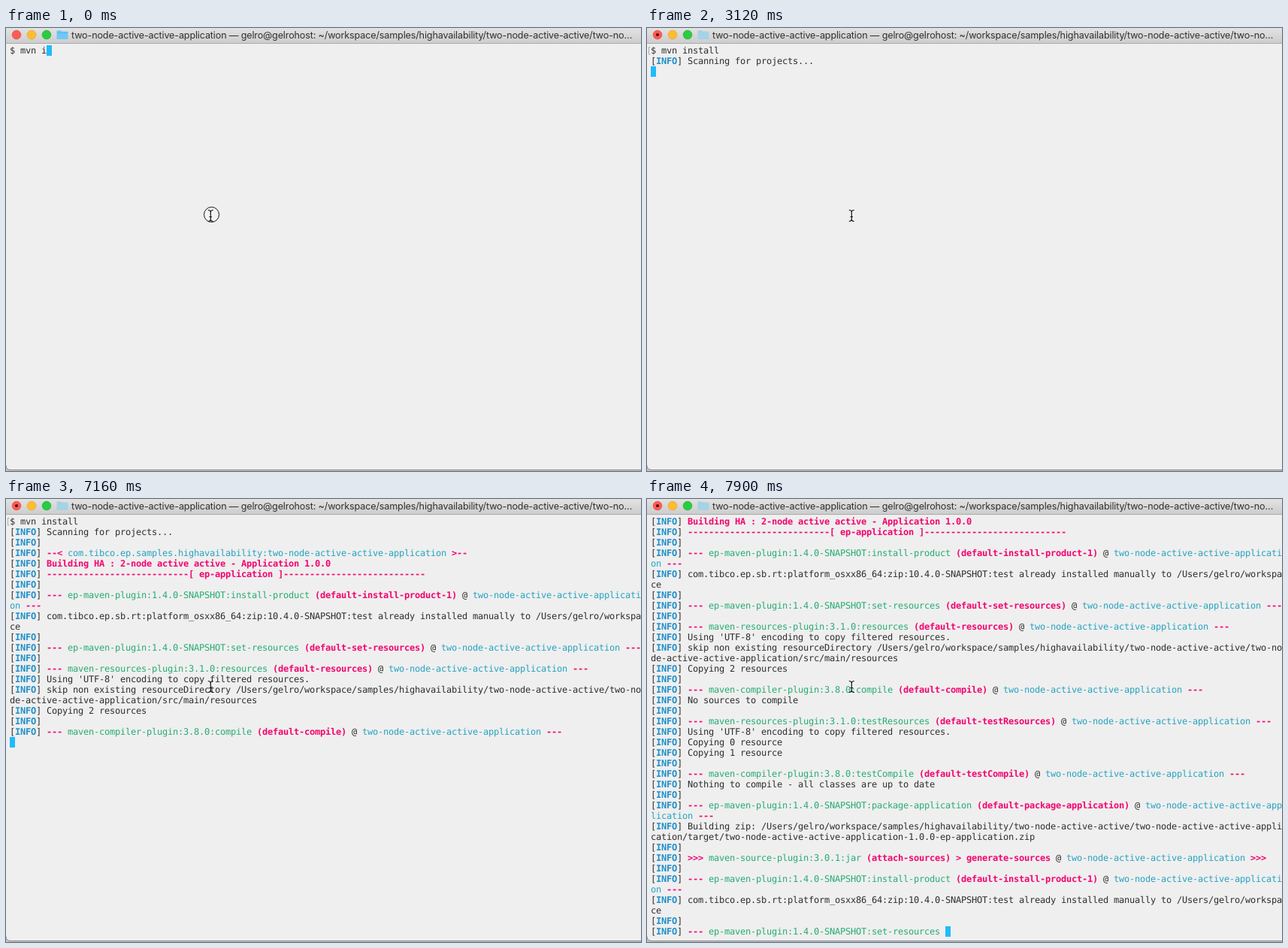
An HTML page that plays this animation: 845 by 590 pixels, repeating every 8000 ms.

```html
<!DOCTYPE html>
<html lang="en">
<head>
<meta charset="utf-8">
<title>Terminal build</title>
<style>
  html, body { margin: 0; width: 100%; height: 100%; overflow: hidden; background: #c4c4c4; }
  svg { display: block; width: 845px; height: 590px; }
  #title { font: 12.6px Inter, Roboto, sans-serif; letter-spacing: -.15px; fill: #303030; }
  #rows { font: 12px "DejaVu Sans Mono", monospace; letter-spacing: -.2246px; text-rendering: geometricPrecision; }
  #rows text { white-space: pre; fill: #2e2e2e; }
  #rows .info { fill: #1f8fc9; font-weight: bold; }
  #rows .pink { fill: #f4046f; font-weight: bold; }
  #rows .cyan { fill: #27a3c0; }
  #rows .green { fill: #26ac74; }
</style>
</head>
<body>
<svg viewBox="0 0 845 590">
  <defs>
    <linearGradient id="bar" x2="0" y2="1">
      <stop stop-color="#e2e2e2"/><stop offset="1" stop-color="#cdcdcd"/>
    </linearGradient>
  </defs>
  <path d="M0 0H845V588H6Q0 588 0 582Z" fill="#efefef"/>
  <path d="M0 582.5Q0 588.5 6 588.5H845" fill="none" stroke="#8c8c8c"/>
  <rect width="845" height="20" fill="url(#bar)"/>
  <rect y="20" width="845" height="1" fill="#aaa"/>
  <g stroke-width=".6">
    <circle cx="14" cy="9" r="5.9" fill="#fc5b57" stroke="#e2453f"/>
    <circle cx="34" cy="9" r="5.9" fill="#fdbd30" stroke="#e0a028"/>
    <circle cx="54" cy="9" r="5.9" fill="#29cc42" stroke="#1eac2d"/>
  </g>
  <circle id="dot" cx="14" cy="9" r="2.1" fill="#5a0906"/>
  <path id="folder" d="M67.5 4.2q0-1 1-1h4.5l1.5 1.3h7q1 0 1 1v8.5q0 1-1 1h-13q-1 0-1-1z"/>
  <path id="fold" d="M68 6.5H82.5" stroke="#4fb3ea" stroke-width=".8"/>
  <text id="title" x="87" y="14">two-node-active-active-application — gelro@gelrohost: ~/workspace/samples/highavailability/two-node-active-active/two-no…</text>
  <rect id="cursor" width="7" height="14" fill="#20bbfd"/>
  <path id="mark" d="M4.5 25.5H2.5V35H4.5" fill="none" stroke="#aaa"/>
  <g id="rows"></g>
  <circle id="click" cx="273.5" cy="248.5" r="10" fill="#f4f4f4" stroke="#111"/>
  <path d="M268.8 242.5Q272.3 242.5 272.3 245.5Q272.3 242.5 275.8 242.5M272.3 245V255M268.8 257.5Q272.3 257.5 272.3 254.5Q272.3 257.5 275.8 257.5M270.5 251.5H274" fill="none" stroke="#111" stroke-width="1.2"/>
</svg>
<script>
const LOOP = 8000, COLS = 120, CELL = 7, LINE = 14, LEFT = 5, TOP = 23;
const NS = "http://www.w3.org/2000/svg";
const $ = id => document.getElementById(id);

const app = "two-node-active-active-application";
const home = "/Users/gelro/workspace";
const project = home + "/samples/highavailability/two-node-active-active/" + app;

// A line is a list of [class, text] spans.
const info = (...spans) => [["", "["], ["info", "INFO"], ["", "] "], ...spans];
const say = text => info(["", text]);
const pink = text => info(["pink", text]);
const goal = (plugin, id, arrow = "---", phase = "") => info(
  ["pink", arrow + " "], ["green", plugin + " "], ["pink", `(${id})${phase}`],
  ["", " @ "], ["cyan", app], ["pink", " " + arrow]);
const ep = "ep-maven-plugin:1.4.0-SNAPSHOT:";
const res = "maven-resources-plugin:3.1.0:";
const javac = "maven-compiler-plugin:3.8.0:";
const blank = say("");
const product = goal(ep + "install-product", "default-install-product-1");
const installed = say("com.tibco.ep.sb.rt:platform_osxx86_64:zip:10.4.0-SNAPSHOT:test already installed manually to " + home);
const encoding = say("Using 'UTF-8' encoding to copy filtered resources.");
const rule = "-".repeat(27);

const lines = [
  [["", "$ mvn install"]],
  say("Scanning for projects..."),
  blank,
  info(["pink", "--< "], ["cyan", "com.tibco.ep.samples.highavailability:" + app], ["pink", " >--"]),
  pink("Building HA : 2-node active active - Application 1.0.0"),
  pink(`${rule}[ ep-application ]${rule}`),
  blank,
  product,
  installed,
  blank,
  goal(ep + "set-resources", "default-set-resources"),
  blank,
  goal(res + "resources", "default-resources"),
  encoding,
  say(`skip non existing resourceDirectory ${project}/src/main/resources`),
  say("Copying 2 resources"),
  blank,
  goal(javac + "compile", "default-compile"),
  say("No sources to compile"),
  blank,
  goal(res + "testResources", "default-testResources"),
  encoding,
  say("Copying 0 resource"),
  say("Copying 1 resource"),
  blank,
  goal(javac + "testCompile", "default-testCompile"),
  say("Nothing to compile - all classes are up to date"),
  blank,
  goal(ep + "package-application", "default-package-application"),
  say(`Building zip: ${project}/target/${app}-1.0.0-ep-application.zip`),
  blank,
  goal("maven-source-plugin:3.0.1:jar", "attach-sources", ">>>", " > generate-sources"),
  blank,
  product,
  installed,
  blank,
  info(["pink", "--- "], ["green", ep + "set-resources "]),
];

function add(parent, tag, attrs) {
  const el = document.createElementNS(NS, tag);
  for (const key in attrs) el.setAttribute(key, attrs[key]);
  return parent.appendChild(el);
}

// Lay the lines out in rows, wrapping at the window's width.
const rows = [];
for (const line of lines) {
  let col = 0, row = null;
  const open = () => rows.push(row = add($("rows"), "text", {}));
  open();
  for (let [cls, text] of line) {
    while (text) {
      if (col === COLS) { open(); col = 0; }
      const part = text.slice(0, COLS - col);
      add(row, "tspan", { x: LEFT + col * CELL, class: cls }).textContent = part;
      col += part.length;
      text = text.slice(part.length);
    }
  }
}
const prompt = rows[0].firstChild;

// [time, typed letters of the goal]
const typing = [[0, 1], [140, 2], [290, 3], [440, 5], [1040, 6], [1190, 7]];
// [time, rows shown, cursor row, cursor column]
const output = [
  [2080, 1, 1, 0], [3120, 2, 2, 0], [4620, 6, 6, 0], [5210, 9, 9, 0],
  [7160, 21, 21, 0], [7460, 33, 33, 0], [7610, 35, 35, 0], [7900, 44, 43, 56],
];
const latest = (steps, t) => steps.filter(s => s[0] <= t).pop();
const show = (el, on) => el.setAttribute("visibility", on ? "visible" : "hidden");

function draw(t) {
  const text = "$ mvn " + "install".slice(0, latest(typing, t)[1]);
  const [, count, curRow, curCol] = latest(output, t) || [0, 1, 0, text.length];
  const scroll = Math.max(0, curRow - 39);
  const busy = t >= 2230;
  prompt.textContent = text;
  rows.forEach((row, i) => {
    show(row, i >= scroll && i < count);
    row.setAttribute("y", TOP + (i - scroll) * LINE + 11);
  });
  $("cursor").setAttribute("x", LEFT + curCol * CELL);
  $("cursor").setAttribute("y", TOP + (curRow - scroll) * LINE);
  show($("mark"), t >= 2080 && !scroll);
  show($("click"), t < 140);
  show($("dot"), busy);
  show($("fold"), !busy);
  $("folder").setAttribute("fill", busy ? "#a6d2e6" : "#70c8f8");
}

const start = performance.now();
function tick() {
  draw((performance.now() - start) % LOOP);
  requestAnimationFrame(tick);
}
tick();
</script>
</body>
</html>
```
